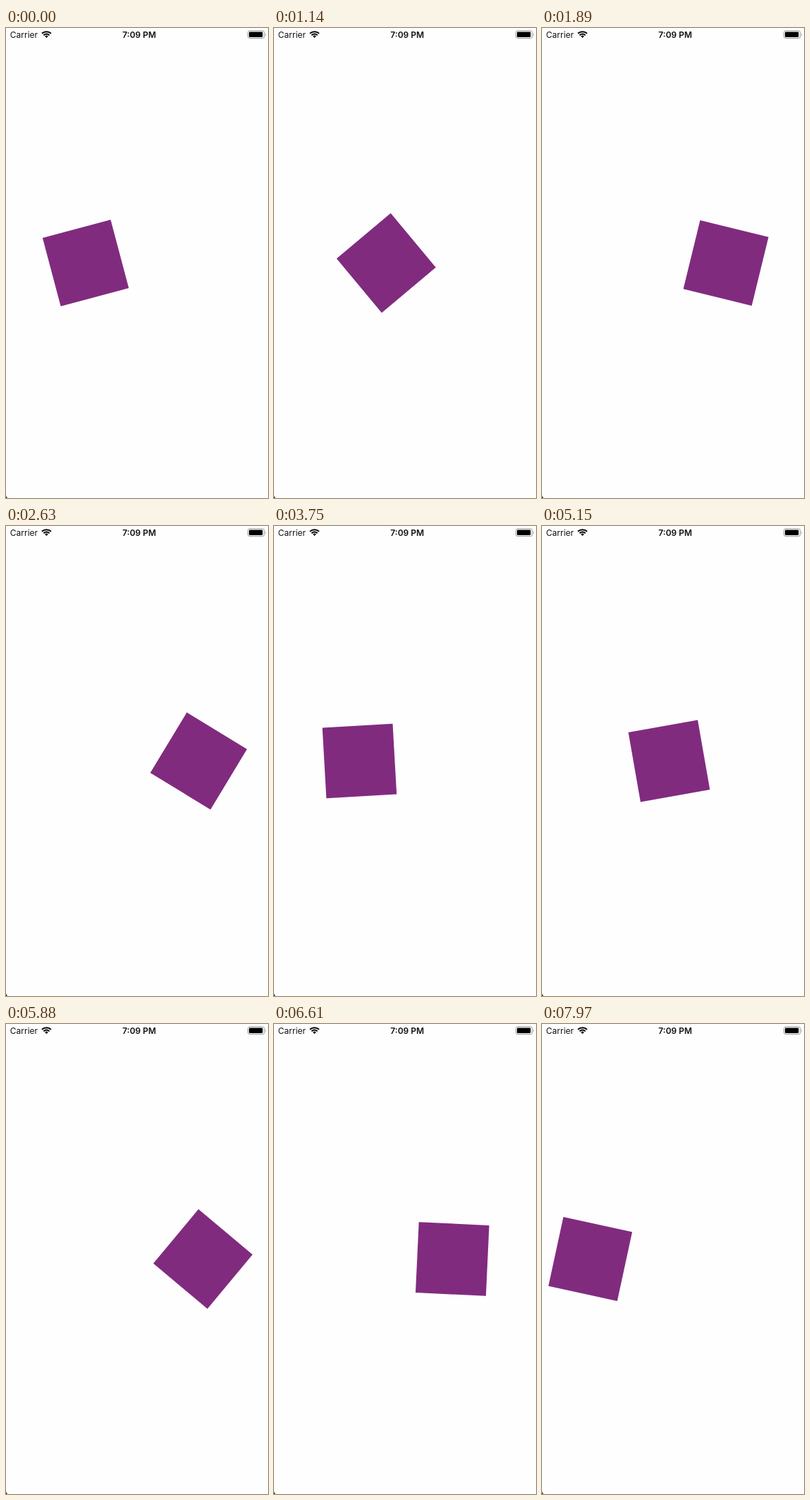
Recreate the animation shown at these times as an HTML page. Size 372 px wide and 665 px high, loop 8000 ms.

```html
<!DOCTYPE html>
<html lang="en">
<head>
<meta charset="utf-8">
<title>Rolling square</title>
<style>
  html, body { margin: 0; width: 100%; height: 100%; overflow: hidden; background: #fefefe; }
  svg { display: block; width: 372px; height: 665px; }
  text { font: 12px Inter, "Liberation Sans", sans-serif; fill: #111; }
  .clock { font-weight: 600; text-anchor: middle; }
</style>
</head>
<body>
<svg viewBox="0 0 372 665">
  <rect width="372" height="665" fill="#fefefe"/>
  <rect id="square" x="-50" y="-50" width="100" height="100" fill="#812b7f"/>

  <text x="5.8" y="13.5">Carrier</text>
  <text class="clock" x="189.2" y="13.5">7:09 PM</text>

  <g fill="none" stroke="#000" stroke-width="2">
    <path d="M51 7.8 A9.3 9.3 0 0 1 64 7.8"/>
    <path d="M53.4 10.3 A5.8 5.8 0 0 1 61.6 10.3"/>
  </g>
  <path d="M57.5 14 L55.2 11.7 A3.2 3.2 0 0 1 59.8 11.7 Z"/>

  <rect x="343.5" y="3.9" width="23.2" height="10.6" rx="2.5" fill="none" stroke="#999"/>
  <rect x="345" y="5.4" width="19.4" height="7.6" rx="1.2"/>
  <path d="M368 7.4 Q370 9.2 368 11 Z" fill="#999"/>

  <path d="M0 661 Q0.4 663.8 2 665 H0 Z" fill="#222"/>
</svg>
<script>
  const LOOP = 8000;
  const TRAVEL = 1880;
  const LEFT = 59.9, RIGHT = 315.2, MIDDLE = 332.5;
  // Start of each pass in ms; passes alternate, beginning with right to left.
  const PASSES = [-1488, 408, 2323, 4262, 6154];

  const square = document.getElementById("square");

  function progressAt(t) {
    const pass = PASSES.findLastIndex(start => start <= t);
    const p = Math.min((t - PASSES[pass]) / TRAVEL, 1);
    return pass % 2 ? p : 1 - p;
  }

  function draw(now) {
    const p = progressAt(now % LOOP);
    const x = LEFT + (RIGHT - LEFT) * p;
    square.setAttribute("transform", `translate(${x} ${MIDDLE}) rotate(${360 * p})`);
  }

  let origin;
  function tick(now) {
    origin ??= now;
    draw(now - origin);
    requestAnimationFrame(tick);
  }
  draw(0);
  requestAnimationFrame(tick);
</script>
</body>
</html>
```
